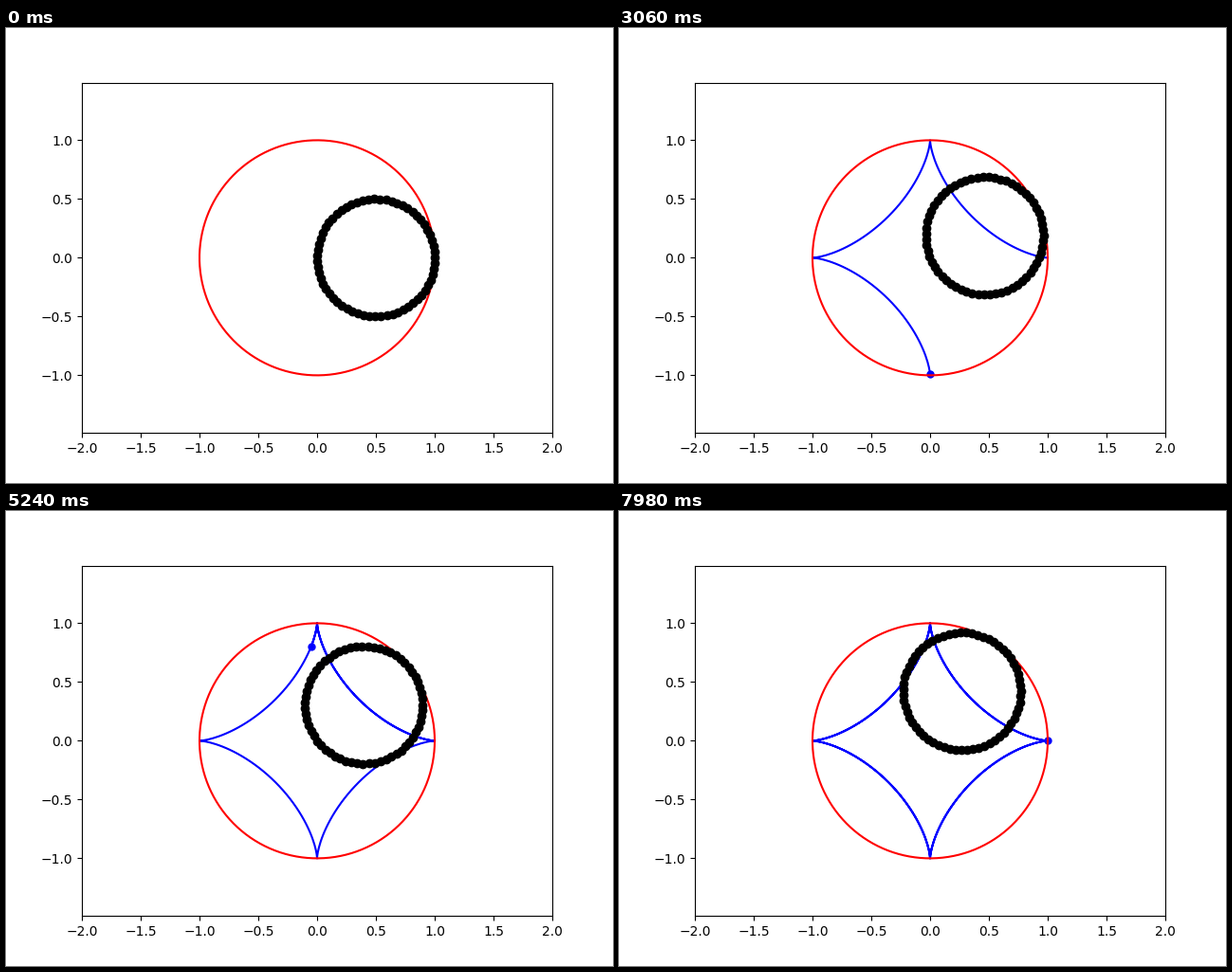
Animation, 640 px wide and 480 px high, one loop 8 s. Source, as a matplotlib script:

```python
import numpy as np
import matplotlib.pyplot as plt
from matplotlib.animation import FuncAnimation

FRAMES = 400
INTERVAL = 20
R = 0.5  # radius of the rolling circle

fig, ax = plt.subplots(figsize=(6.4, 4.8), dpi=100)
ax.set_xlim(-2, 2)
half_height = 2 * (4.8 * 0.77) / (6.4 * 0.775)  # equal scale on both axes
ax.set_ylim(-half_height, half_height)

# The astroid is traced twice per loop
angle = 4 * np.pi * np.arange(FRAMES) / FRAMES
path_x, path_y = np.cos(angle) ** 3, np.sin(angle) ** 3

ring = np.arange(0, 2 * np.pi, 0.1)
ring_x, ring_y = R * np.cos(ring), R * np.sin(ring)

trail, = ax.plot([], [], "b-")
tip, = ax.plot([], [], "bo", markersize=5)

turn = np.linspace(0, 2 * np.pi, 400)
ax.plot(np.cos(turn), np.sin(turn), "r-")

beads, = ax.plot([], [], "ko")


def update(i):
    trail.set_data(path_x[:i + 1], path_y[:i + 1])
    tip.set_data([path_x[i]], [path_y[i]])
    phi = i / FRAMES  # the ring's centre advances one radian per loop
    beads.set_data(ring_x + R * np.cos(phi), ring_y + R * np.sin(phi))
    return trail, tip, beads


anim = FuncAnimation(fig, update, frames=FRAMES, interval=INTERVAL,
                     repeat=True, repeat_delay=0)
plt.show()
```
